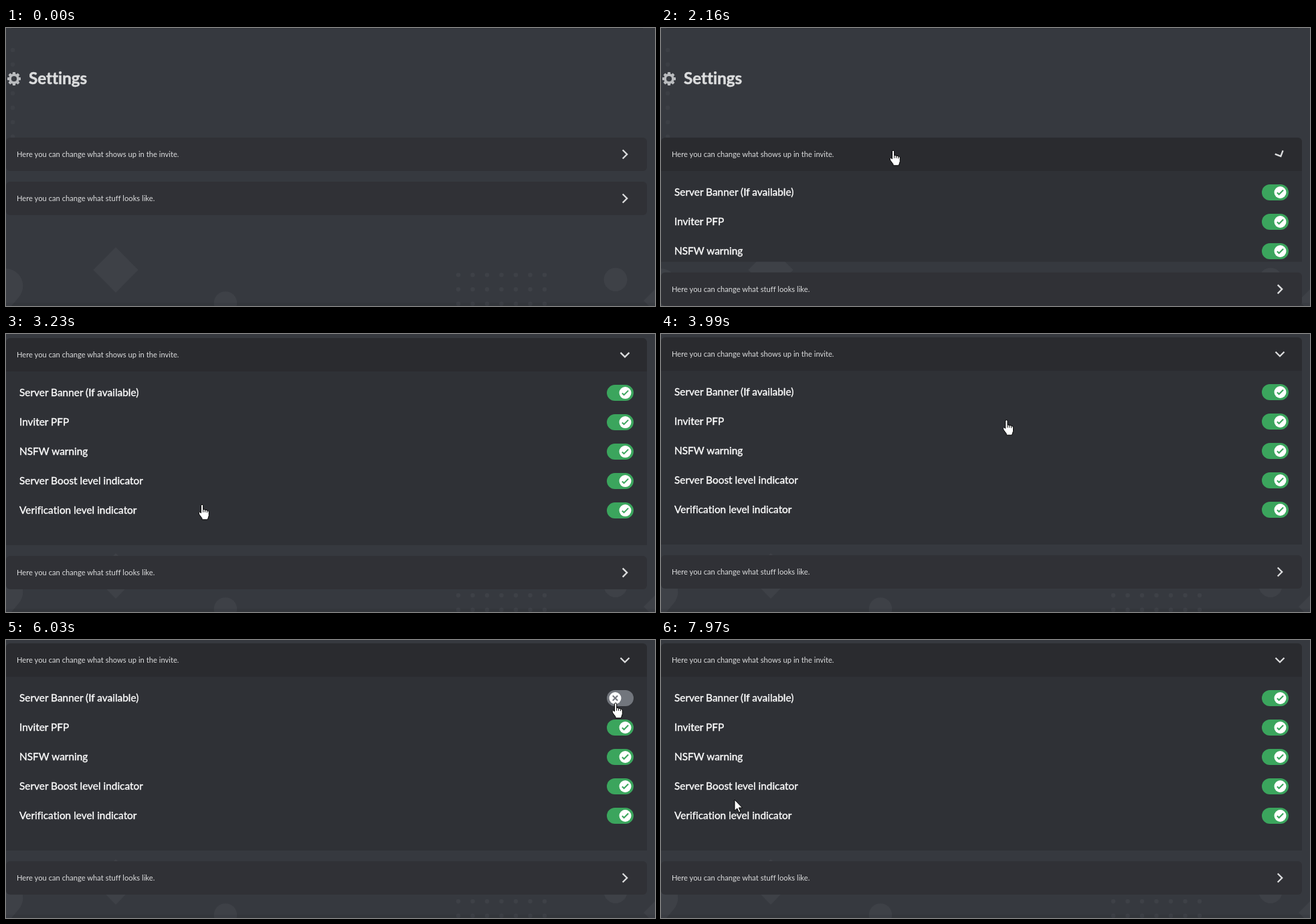
Recreate the animation shown at these times as an HTML page. Size 970 by 416 pixels, loop 8 s.

```html
<!DOCTYPE html>
<html lang="en">
<head>
<meta charset="utf-8">
<title>Invite settings</title>
<style>
  html, body { margin: 0; width: 100%; height: 100%; overflow: hidden; background: #36393f; }
  svg { display: block; }
  text { font-family: Lato, "Open Sans", sans-serif; font-variant-ligatures: none; }
  .title { font-size: 24.2px; font-weight: 700; fill: #dcddde; stroke: #dcddde; stroke-width: .5px; }
  .hint { font-size: 11.2px; fill: #dcddde; }
  .label { font-size: 15.4px; fill: #fff; stroke: #fff; stroke-width: .35px; }
  .chevron { fill: none; stroke: #dcddde; stroke-width: 2.3; }
  .mark { fill: none; stroke-width: 2; }
  .art { fill: #3e4147; }
  .cursor { fill: #fff; stroke: #000; stroke-linejoin: round; }
</style>
</head>
<body>
<svg id="stage" width="970" height="416" viewBox="0 0 970 416"></svg>
<script>
const LOOP = 8000;
const HEAD_Y = 164, HEAD_H = 50, BODY_H = 260, SCROLL = 159;
const LABEL_Y = 32, LABEL_STEP = 44, LABEL_HALF = 12;
const LABELS = ["Server Banner (If available)", "Inviter PFP", "NSFW warning",
  "Server Boost level indicator", "Verification level indicator"];
const GREEN = [59, 165, 93], GREY = [114, 118, 125];
const CLOSED = [48, 49, 54], OPEN = [42, 43, 47];

// Pointer moves: each eases from wherever the last one stopped
const ENTRY = { x: 560, y: -22 };
const MOVES = [
  { from: 760, to: 1500, x: 341, y: 172 },
  { from: 1740, to: 2110, x: 347, y: 183 },
  { from: 2280, to: 2580, x: 293, y: 255 },
  { from: 3420, to: 3820, x: 784, y: 130 },
  { from: 3820, to: 4220, x: 101, y: 126 },
  { from: 4250, to: 4760, x: 925, y: 92 },
  { from: 5350, to: 5650, x: 842, y: 98 },
  { from: 5650, to: 6030, x: 911, y: 94 },
  { from: 6450, to: 7040, x: 198, y: 132 },
  { from: 7100, to: 7500, x: 130, y: 278 },
  { from: 7500, to: 7970, x: 110, y: 239 }
];

const clamp = v => Math.min(1, Math.max(0, v));
const span = (t, a, b) => clamp((t - a) / (b - a));
const smooth = p => p * p * (3 - 2 * p);
const ease = (t, a, b) => smooth(span(t, a, b));
const mix = (a, b, p) => a + (b - a) * p;
const blend = (a, b, p) => `rgb(${a.map((v, i) => Math.round(mix(v, b[i], p)))})`;
const repeat = (n, fn) => Array.from({ length: n }, (_, i) => fn(i)).join("");
const $ = id => document.getElementById(id);
const set = (id, attrs) => {
  for (const k in attrs) $(id).setAttribute(k, attrs[k]);
};
const move = (id, x, y, turn = 0) =>
  set(id, { transform: `translate(${x} ${y}) rotate(${turn})` });
const show = (id, on) => set(id, { visibility: on ? "visible" : "hidden" });

const dots = (x, y, cols, rows) => repeat(cols * rows, i =>
  `<circle cx="${x + i % cols * 21.5}" cy="${y + Math.floor(i / cols) * 21.6}" r="3.3"/>`);

const gear = `<g transform="translate(12 76)" fill="#b9bbbe">
  ${repeat(8, i => `<path d="M-2.6-6L-1.9-10H1.9L2.6-6Z" transform="rotate(${i * 45})"/>`)}
  <circle r="5.8" fill="none" stroke="#b9bbbe" stroke-width="3.4"/></g>`;

const markPath = on => on > .5 ? "M-4.6 .3L-1.9 3L4.6-3.5" : "M-3.7-3.7L3.7 3.7M3.7-3.7L-3.7 3.7";

const option = i => `<g transform="translate(0 ${LABEL_Y + i * LABEL_STEP})">
  <text class="label" x="20" y="5.3">${LABELS[i]}</text>
  <rect id="track${i}" x="898" y="-12" width="40" height="24" rx="12" fill="rgb(${GREEN})"/>
  <g id="knob${i}" transform="translate(925.5 0)"><circle r="9" fill="#fff"/>
    <path id="mark${i}" class="mark" d="${markPath(1)}" stroke="rgb(${GREEN})"/></g></g>`;

const header = (n, text) => `
  <rect id="head${n}" width="958" height="${HEAD_H}" rx="6" fill="rgb(${CLOSED})"/>
  <rect id="foot${n}" y="40" width="958" height="10" visibility="hidden"/>
  <text class="hint" x="16" y="29">${text}</text>
  <path id="chev${n}" class="chevron" d="M-3.3-6.5L3.2 0L-3.3 6.5" transform="translate(925 25)"/>`;

$("stage").innerHTML = `
  <rect width="970" height="416" fill="#36393f"/>
  <g class="art">
    <g opacity=".8">${dots(10, 33, 1, 7)}</g>
    ${dots(676, 369.5, 7, 3)}
    <path d="M164 328l33.5 34l-33.5 34l-33.5-34z"/>
    <path d="M0 360a26 26 0 0 1 19 43L8 416H0z"/>
    <circle cx="328" cy="411.5" r="17.3"/>
    <circle cx="911" cy="376.5" r="17.5"/>
    <path d="M953 408l17-17v25h-9z"/>
  </g>
  <rect y="411" width="970" height="5" opacity=".06"/>
  <g id="page">
    <rect x="8" width="944" height="1" fill="#2f3237"/>
    ${gear}
    <text class="title" x="34" y="84">Settings</text>
    <g transform="translate(0 ${HEAD_Y})">
      <svg id="body" y="${HEAD_H}" width="958" height="0" overflow="hidden">
        <rect width="958" height="${BODY_H}" fill="#2f3136"/>
        ${repeat(LABELS.length, option)}
      </svg>
      ${header(1, "Here you can change what shows up in the invite.")}
    </g>
    <g id="second">${header(2, "Here you can change what stuff looks like.")}</g>
  </g>
  <g id="cursor" class="cursor">
    <path id="arrow" d="M0 0v16.500l3.800-3.500l2.700 6l2.500-1l-2.600-6h5.100z"/>
    <g id="hand" transform="translate(0 .8)">
      <path d="M-1.500 12V1a1.600 1.600 0 0 1 3.200 0V6.500l6 1.500q2.600 .6 2.600 3v5l-2 6H0v-2l-3.700-5q-2.200-3.600 0-4.500z"/>
      <path d="M1.700 6.500v4.500M4.600 7.500v3.500M7.500 8.500v3" fill="none"/>
    </g>
  </g>`;

function pointer(t) {
  let { x, y } = ENTRY;
  for (const m of MOVES) {
    const p = ease(t, m.from, m.to);
    x = mix(x, m.x, p);
    y = mix(y, m.y, p);
  }
  return { x, y };
}

// Headers and label rows are clickable; the gaps between them are not.
function clickable(x, y, grow) {
  if (y >= 0 && y < HEAD_H) return true;
  const row = y - HEAD_H - LABEL_Y + LABEL_HALF;
  return y < HEAD_H + grow && x > 20 && x < 938 && row >= 0 &&
    row < LABELS.length * LABEL_STEP && row % LABEL_STEP < 2 * LABEL_HALF;
}

function draw(t) {
  const grow = BODY_H * ease(t, 2058, 2258);
  const scroll = SCROLL * smooth(span(t, 2940, 3250) ** .8);
  move("page", 0, -scroll);
  move("second", 0, HEAD_Y + HEAD_H + grow + 16);
  set("body", { height: grow });
  move("chev1", 925, 25, 90 * (1 - (1 - span(t, 2065, 2265)) ** 2));

  const fill = blend(CLOSED, OPEN, span(t, 1190, 1290));
  set("head1", { fill });
  set("foot1", { fill });
  show("foot1", grow > 0);

  const on = 1 - ease(t, 4970, 5190) + ease(t, 6240, 6450);
  const color = blend(GREY, GREEN, on);
  set("track0", { fill: color });
  set("mark0", { stroke: color, d: markPath(on) });
  move("knob0", mix(910.5, 925.5, on), 0);

  const { x, y } = pointer(t);
  const hand = clickable(x, y - HEAD_Y + scroll, grow);
  show("hand", hand);
  show("arrow", !hand);
  move("cursor", x, y);
}

const start = performance.now();
function tick() {
  draw((performance.now() - start) % LOOP);
  requestAnimationFrame(tick);
}
tick();
</script>
</body>
</html>
```
